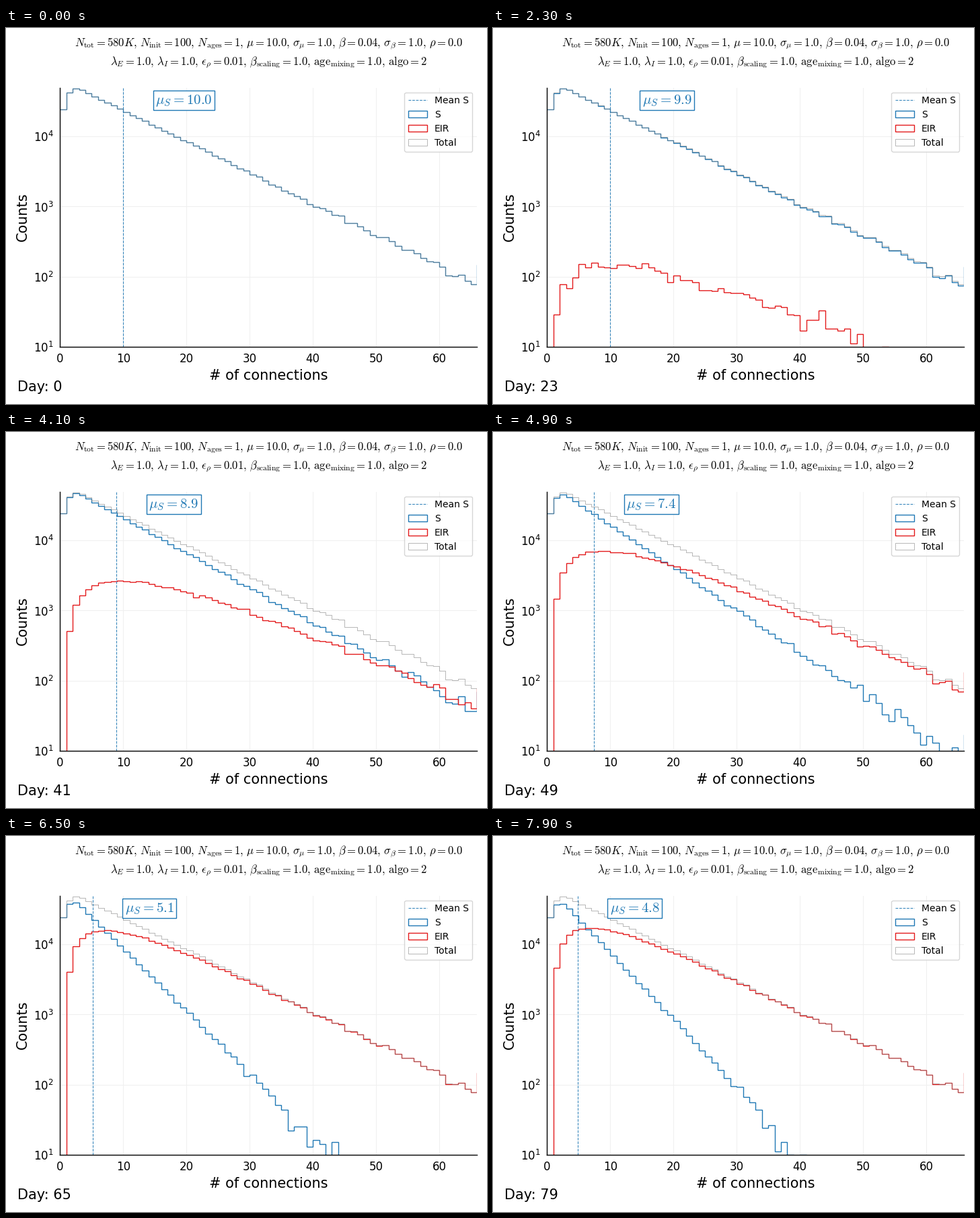
Animation, 715 px wide and 559 px high, one loop 8 s. Source, as a matplotlib script:

```python
import numpy as np
import matplotlib.pyplot as plt
from matplotlib.animation import FuncAnimation
from matplotlib.patches import Patch

W, H, DPI = 715, 559, 100
DAYS, MAX_DEGREE = 80, 66
BLUE, RED, GREY = "#1f78b4", "#e31a1c", "#808080"

plt.rcParams["font.family"] = "DejaVu Sans"
plt.rcParams["mathtext.fontset"] = "cm"

# People per number of connections: exponential decay with a dip near zero
rng = np.random.default_rng(4)
degree = np.arange(MAX_DEGREE + 1)
density = 46000 * np.exp(-0.1024 * (degree - 3))
density *= 1 - 0.618 * np.exp(-0.88 * degree ** 1.54)
density[-1] *= 1.9  # the last bin is twice as wide
total = rng.poisson(density)

# Each person falls ill once exposure times connections passes a threshold
thresholds = [np.sort(rng.exponential(size=n)) for n in total]


def exposure(day):
    """Cumulative infection pressure per connection: a logistic epidemic."""
    return 0.12 / (1 + np.exp(-0.168 * (day - 53.8)))


def infected_counts(day):
    a = exposure(day)
    return np.array([np.searchsorted(t, a * k)
                     for k, t in zip(degree, thresholds)])


def mean_degree(day):
    return 0.32 + 1 / (0.1034 + exposure(day))


def visible(values):
    return np.maximum(values, 0.1)  # keeps the log scale finite


fig = plt.figure(figsize=((W + 1e-6) / DPI, (H + 1e-6) / DPI), dpi=DPI,
                 facecolor="white")
ax = fig.add_axes([80.35 / W, 85.35 / H, 620 / W, 385 / H])
ax.set_yscale("log")
ax.set_axisbelow(True)
ax.grid(True, which="major", color="#f0f0f0", lw=0.8)
ax.tick_params(which="both", color="none", labelsize=12)
for side in ("top", "right"):
    ax.spines[side].set_visible(False)
for side in ("left", "bottom"):
    ax.spines[side].set_linewidth(1)
ax.set_xlabel("# of connections", fontsize=15)
ax.set_ylabel("Counts", fontsize=15)


def label(x, y, s, **kw):
    return fig.text(x / W, 1 - y / H, s, va="baseline", **kw)


def params(*parts):
    return "$" + r",\, ".join(parts) + "$"


label(390.35, 28, params(
    r"N_\mathrm{tot} = 580K", r"N_\mathrm{init} = 100", r"N_\mathrm{ages} = 1",
    r"\mu = 10.0", r"\sigma_\mu = 1.0", r"\beta = 0.04", r"\sigma_\beta = 1.0",
    r"\rho = 0.0"), ha="center", fontsize=12)
label(390.35, 55, params(
    r"\lambda_E = 1.0", r"\lambda_I = 1.0", r"\epsilon_\rho = 0.01",
    r"\beta_\mathrm{scaling} = 1.0", r"\mathrm{age}_\mathrm{mixing} = 1.0",
    r"\mathrm{algo} = 2"), ha="center", fontsize=12)
day_text = label(17, 540, "", fontsize=15)

edges = np.arange(MAX_DEGREE + 2)
styles = {
    "S": dict(ec=BLUE, lw=1),
    "EIR": dict(ec=RED, lw=1),
    "Total": dict(ec=GREY, lw=0.5, alpha=0.8),
}
hists = {name: ax.stairs(visible(total), edges, baseline=None, **style)
         for name, style in styles.items()}
mean_line = ax.axvline(10, color=BLUE, ls="--", lw=0.75, alpha=0.9,
                       label="Mean S")
mean_text = ax.text(15, 0.95, "", transform=ax.get_xaxis_transform(),
                    color=BLUE, fontsize=15, va="center", ha="left",
                    bbox=dict(fc="white", ec=BLUE, lw=1, pad=2.5))
ax.set_xlim(0, MAX_DEGREE)
ax.set_ylim(10, 5e4)
ax.legend(handles=[mean_line] + [Patch(fill=False, label=name, **style)
                                 for name, style in styles.items()],
          loc="upper right", fontsize=10)


def update(day):
    infected = infected_counts(day)
    hists["S"].set_data(visible(total - infected))
    hists["EIR"].set_data(visible(infected))
    m = mean_degree(day)
    mean_line.set_xdata([m, m])
    mean_text.set_x(m + 5.12)
    mean_text.set_text(rf"$\mu_S = {m:.1f}$")
    day_text.set_text(f"Day: {day}")
    return [*hists.values(), mean_line, mean_text, day_text]


anim = FuncAnimation(fig, update, frames=DAYS, interval=100, repeat=True,
                     repeat_delay=0, blit=False)
plt.show()
```
